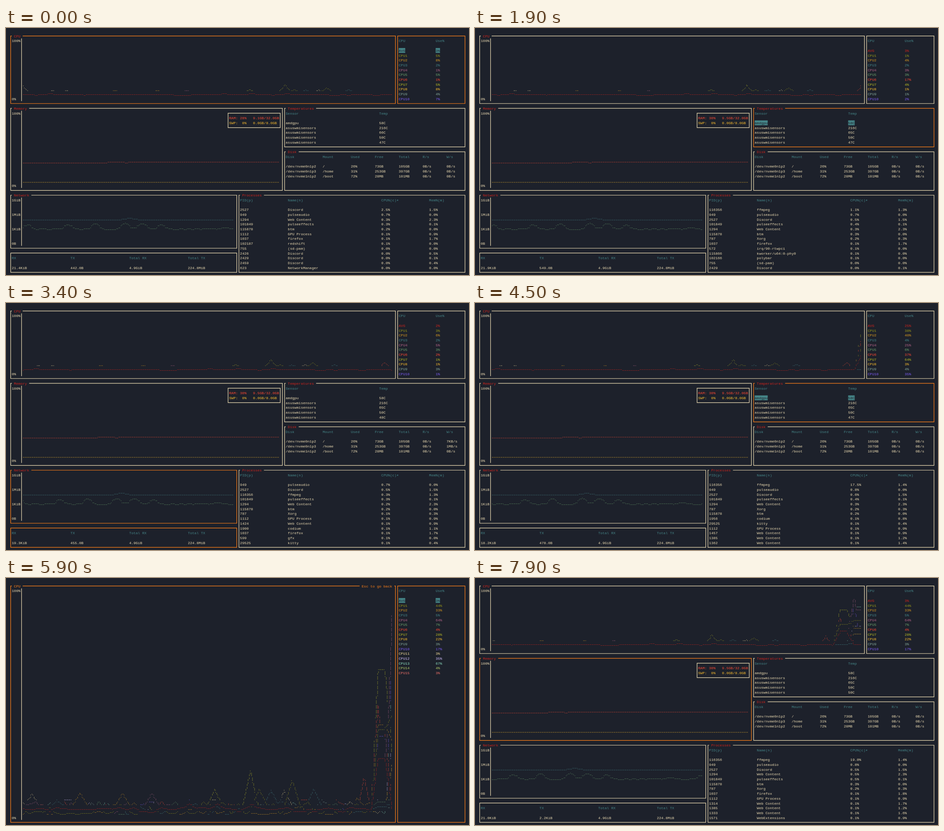
An HTML page that plays this animation: 1024 by 547 pixels, repeating every 8000 ms.

```html
<!DOCTYPE html>
<html lang="en">
<head>
<meta charset="utf-8">
<title>System monitor</title>
<style>
  html, body { margin: 0; height: 100%; overflow: hidden; background: #1d212b; }
  svg { display: block; width: 100vw; height: 100vh; }
  text { font: 8.0125px "Liberation Mono", "DejaVu Sans Mono", monospace; white-space: pre; }
  path { fill: none; stroke-width: 1.2; }
  .dots { stroke-width: 1; }
</style>
</head>
<body>
<svg id="screen" viewBox="0 0 1024 547"></svg>
<script>
const BG = "#1d212b", CREAM = "#ebdbb2", RED = "#cc241d", TEAL = "#458588", ORANGE = "#fe8019";
const CORE_COLORS = [RED, "#98971a", "#d79921", TEAL, "#b16286", "#689d6a", "#fb4934", "#b8bb26",
  "#fabd2f", "#83a598", "#7c5cf5", "#f3dc9a", "#d3c0ff", "#8fe3c4", "#b5d06a", "#f0716a"];

// Terminal grid: cell size and position of column / row
const W = 4.8075, H = 10.683;
const X = col => 8 + col * W;
const Y = row => 17.7 + row * H;

// [start ms, data update, focused widget]; "full" is the expanded CPU view
const TIMELINE = [
  [0, 0, "cpu"], [1100, 1, "cpu"], [1500, 1, "mem"], [1900, 1, "temp"], [2200, 1, "disk"],
  [2300, 2, "disk"], [3000, 2, "mem"], [3400, 2, "net"], [3500, 3, "net"], [3800, 3, "proc"],
  [4500, 3, "temp"], [4600, 4, "temp"], [5200, 4, "cpu"], [5800, 5, "cpu"], [5900, 5, "full"],
  [6900, 6, "full"], [7200, 6, "cpu"], [7900, 6, "mem"]
];
const LOOP = 8000, HISTORY = 53;

// Text per update. cpu: average, then cores; procs: "pid cpu memory", cpu defaults to .1
const READINGS = {
  0: { cpu: "3 5 8 2 1 5 1 5 8 4 7", net: "21.4KiB 442.0B", temps: "58 216 66 50 47",
    procs: "2527 2.5,949 .7,1294 .3,101849 .3,115878 .2,1112,1037,102187,755 0,2426 0,2429 0,2459 0,623 0" },
  1: { cpu: "3 1 4 2 3 3 17 4 1 1 2", net: "21.9KiB 549.0B", temps: "58 216 65 50 47",
    procs: "116356 1.1 1.3,949 .7,2527 .5,101849 .4,1294 .3,115878 .3,787 .2,1037,572,115866,102166,755 0,2429 0" },
  2: { cpu: "2 3 6 2 5 3 2 1 1 3 1", net: "19.3KiB 455.0B", temps: "58 216 65 50 48",
    procs: "949 .7,2527 .5,116356 .3 1.3,101849 .3,1294 .2,115878 .2,787,1112,1424,1900,1037,599,29525" },
  4: { cpu: "25 38 40 4 25 6 37 64 3 4 35", net: "18.2KiB 478.0B", temps: "58 216 65 50 47",
    procs: "116356 17.5,949 .8,2527 .6,101849 .4,1294 .3,787 .2,115878 .2,1956,29525,1112,1457,1385,1362" },
  6: { cpu: "3 44 33 5 64 7 4 28 22 3 17 3 35 67 4 3", net: "21.0KiB 2.2KiB", temps: "58 216 65 50 50",
    procs: "116356 19,949 .8,2527 .5,1294 .5,101849 .5,115878 .3,787 .2,1037 .1 1.8,1112,1314,1385,1333,1571" }
};
const reading = n => n < 0 ? undefined : READINGS[n] ?? READINGS[n + 1];

// name: { pid: memory % }
const APPS = {
  "Discord": { 2527: 1.5, 2426: .5, 2429: .1, 2459: .4 },
  "Web Content": { 1294: 2.3, 1424: .9, 1457: .9, 1385: 1.2, 1362: 1.4, 1314: 1.7, 1333: 1.6 },
  "codium": { 1900: 1.1, 1956: .8 },
  "GPU Process": { 1112: .9 }, "WebExtensions": { 1571: .9 }, "firefox": { 1037: 1.7 },
  "ffmpeg": { 116356: 1.4 }, "pulseeffects": { 101849: .1 }, "Xorg": { 787: .3 }, "kitty": { 29525: .4 },
  "pulseaudio": { 949: 0 }, "btm": { 115878: 0 }, "redshift": { 102187: 0 }, "(sd-pam)": { 755: 0 },
  "NetworkManager": { 623: 0 }, "irq/90-rtwpci": { 572: 0 }, "kworker/u64:0-phy0": { 115866: 0 },
  "polybar": { 102166: 0 }, "gfx": { 599: 0 }
};

// CPU peaks: [core, time in updates, height]
const PEAKS = [
  [0, -49, 4.8], [0, -24, 4.8], [0, -20, 4.9], [0, -15, 4.8],
  [11, -52.9, 19], [11, -48.6, 9.5], [11, -46.6, 9.4], [2, -39.7, 9.8], [2, -33.6, 9.6], [4, -29.4, 9.6],
  [7, -20.4, 11.4], [7, -15.3, 19.7], [1, -14, 11.4], [3, -12.3, 11], [11, -10.4, 11], [1, -9.3, 15.6],
  [3, -6.2, 11.5], [6, 3, 50], [4, 5, 88], [10, 5, 72]
];
// Upload bursts: [time in updates, height]
const BURSTS = [[-51.5, 8], [-41.5, 9], [-34.5, 13], [-27, 13], [-22.7, 12], [-18, 9], [-2, 6], [6, 9]];

const rand = (a, b) => {
  const s = Math.sin(a * 127.1 + b * 311.7) * 43758.5453;
  return s - Math.floor(s);
};
// Straight line between the values at whole updates
function lerp(at, k) {
  const a = Math.floor(k), f = k - a;
  return at(a) * (1 - f) + at(a + 1) * f;
}
const sample = (c, k) => +(reading(k)?.cpu.split(" ")[c] ??
  (c ? .3 + 6.5 * rand(c, k) ** 3 : 1.4 + 2.2 * rand(99, k)));
const core = c => {
  const peaks = PEAKS.filter(p => p[0] === c);
  return k => Math.max(lerp(j => sample(c, j), k),
    ...peaks.map(([, at, h]) => h * (1 - Math.abs(k - at) / (.9 + 10 / h))));
};
const ram = k => k < -35.3 || Math.abs(k + 31.5) < .35 ? 27.5 : 29;
const swap = () => 0;
const rx = k => 48.6 + 5.8 * Math.max(0, 1 - Math.abs(k + 26) / 2.6);
const tx = k => BURSTS.reduce((v, [at, h]) => v + h * Math.exp(-(((k - at) / 1.3) ** 2)),
  lerp(j => 26.3 + 3.5 * rand(55, j), k));

function text(col, row, s, fill = CREAM, lit = false) {
  const back = lit
    ? `<rect x="${X(col)}" y="${Y(row) - H / 2}" width="${s.length * W}" height="${H}" fill="${TEAL}"/>` : "";
  return `${back}<text x="${X(col)}" y="${Y(row) + 3.1}" fill="${lit ? BG : fill}">${s}</text>`;
}
const line = (cols, row, cells, fill, lit) =>
  cells.map((s, i) => text(cols[i], row, s, fill, lit)).join("");

// Header, blank line, then rows; the first row is lit when focused
const table = (cols, row, head, rows, lit, colors = []) =>
  line(cols, row, head, TEAL) +
  rows.map((r, i) => line(cols, row + 2 + i, r, colors[i], lit && !i)).join("");

function box(c1, r1, c2, r2, focused, title = "", note = "") {
  const x1 = X(c1 + .5), x2 = X(c2 + .5), y1 = Y(r1), y2 = Y(r2), color = focused ? ORANGE : CREAM;
  let d = `M${title ? X(c1 + 1) : x1} ${y1}H${x1}V${y2}H${x2}V${y1}`, s = "";
  if (note) {
    const at = c2 - 1 - note.length;
    d += `H${X(c2)}M${X(at - 1)} ${y1}`;
    s += text(at, r1, note, ORANGE);
  }
  d += title ? `H${X(c1 + title.length + 3)}` : "Z";
  if (title) s += text(c1 + 2, r1, title, note ? ORANGE : RED);
  return `<path stroke="${color}" d="${d}"/>` + s;
}

// Braille chart: 2x4 dots, 2px apart, per cell; the last series to touch a cell owns it
function plot(n, cols, row, rows, series) {
  const count = cols * 2, step = count / HISTORY, cells = {}, paths = {};
  for (const [color, at] of series) {
    let last;
    for (let i = 0; i < count; i++) {
      const y = Math.floor(at(n - (count - 1 - i) / step) / 100 * rows * 4);
      const dir = Math.sign(y - (last ?? y));
      for (let j = dir ? last + dir : y; ; j += dir) {
        const cx = i >> 1, cy = j >> 2, key = cx + "," + cy;
        if (cells[key]?.color !== color) cells[key] = { color, d: "" };
        const px = X(6 + cx) + .9 + i % 2 * 2, py = Y(row + rows - 1 - cy) + 3.6 - j % 4 * 2;
        cells[key].d += `M${px.toFixed(2)} ${py.toFixed(2)}h1`;
        if (j === y) break;
      }
      last = y;
    }
  }
  for (const { color, d } of Object.values(cells)) paths[color] = (paths[color] || "") + d;
  return Object.entries(paths).map(([c, d]) => `<path class="dots" stroke="${c}" d="${d}"/>`).join("");
}

const axis = (row, rows, labels) =>
  `<path stroke="${CREAM}" d="M${X(5.5)} ${Y(row - .5)}V${Y(row + rows - .5)}"/>` +
  labels.map((s, i) => text(1, row + (rows - 1) * i / (labels.length - 1), s)).join("");

function cpu(n, focus) {
  const full = focus === "full", on = full || focus === "cpu", end = full ? 49 : 14;
  const series = CORE_COLORS.map((c, i) => [c, core(i)]).reverse();
  const rows = CORE_COLORS.slice(0, full ? 16 : 11)
    .map((_, i) => [i ? "CPU" + i : "AVG", Math.round(sample(i, n)) + "%"]);
  return box(0, 0, 177, end, on, "CPU", full ? "Esc to go back" : "") + box(178, 0, 209, end, on) +
    axis(1, end - 1, ["100%", "0%"]) + plot(n, 170, 1, end - 2, series) +
    table([179, 196], 1, ["CPU", "Use%"], rows, on, CORE_COLORS);
}

function memory(n, on) {
  return box(0, 15, 125, 32, on, "Memory") + axis(16, 16, ["100%", "0%"]) +
    plot(n, 118, 16, 15, [["#fb4934", ram], ["#fabd2f", swap]]) + box(100, 16, 124, 19) +
    text(101, 17, n ? "RAM: 30%   9.5GB/32.0GB" : "RAM: 28%   9.1GB/32.0GB", "#fb4934") +
    text(101, 18, "SWP:  0%   0.0GB/8.0GB", "#fabd2f");
}

function temps(n, on) {
  const rows = reading(n).temps.split(" ").map((t, i) => [i ? "asuswmisensors" : "amdgpu", t + "C"]);
  return box(126, 15, 209, 23, on, "Temperatures") + table([127, 170], 16, ["Sensor", "Temp"], rows, on);
}

function disk(n, on) {
  const writes = n === 2 ? ["7KB/s", "1MB/s"] : ["0B/s", "0B/s"];
  return box(126, 24, 209, 32, on, "Disk") +
    table([127, 144, 157, 168, 179, 190, 201], 25, ["Disk", "Mount", "Used", "Free", "Total", "R/s", "W/s"], [
      ["/dev/nvme0n1p2", "/", "26%", "73GB", "105GB", "0B/s", writes[0]],
      ["/dev/nvme0n1p3", "/home", "31%", "253GB", "397GB", "0B/s", writes[1]],
      ["/dev/nvme1n1p2", "/boot", "72%", "28MB", "101MB", "0B/s", "0B/s"]
    ], on);
}

function network(n, on) {
  const totals = [...reading(n).net.split(" "), "4.9GiB", "224.8MiB"];
  return box(0, 33, 104, 44, on, "Network") + axis(34, 10, ["1GiB", "1MiB", "1KiB", "0B"]) +
    plot(n, 97, 34, 9, [[TEAL, rx], ["#689d6a", tx]]) + box(0, 45, 104, 49, on) +
    table([1, 28, 55, 82], 46, ["RX", "TX", "Total RX", "Total TX"], [totals]);
}

function processes(n, on) {
  const pct = v => (+v).toFixed(1) + "%";
  const rows = reading(n).procs.split(",").map(row => {
    const [pid, use = .1, mem] = row.split(" ");
    const [name, pids] = Object.entries(APPS).find(([, p]) => pid in p);
    return [pid, name, pct(use), pct(mem ?? pids[pid])];
  });
  return box(105, 33, 209, 49, on, "Processes") +
    table([106, 128, 171, 193], 34, ["PID(p)", "Name(n)", "CPU%(c)▾", "Mem%(m)"], rows, on);
}

function render(n, focus) {
  if (focus === "full") return cpu(n, focus);
  return cpu(n, focus) + memory(n, focus === "mem") + temps(n, focus === "temp") +
    disk(n, focus === "disk") + network(n, focus === "net") + processes(n, focus === "proc");
}

const screen = document.getElementById("screen"), start = performance.now();
let shown;
function tick() {
  const t = (performance.now() - start) % LOOP;
  const state = TIMELINE.filter(s => s[0] <= t).pop();
  if (state !== shown) {
    shown = state;
    screen.innerHTML = render(state[1], state[2]);
  }
  requestAnimationFrame(tick);
}
tick();
</script>
</body>
</html>
```
